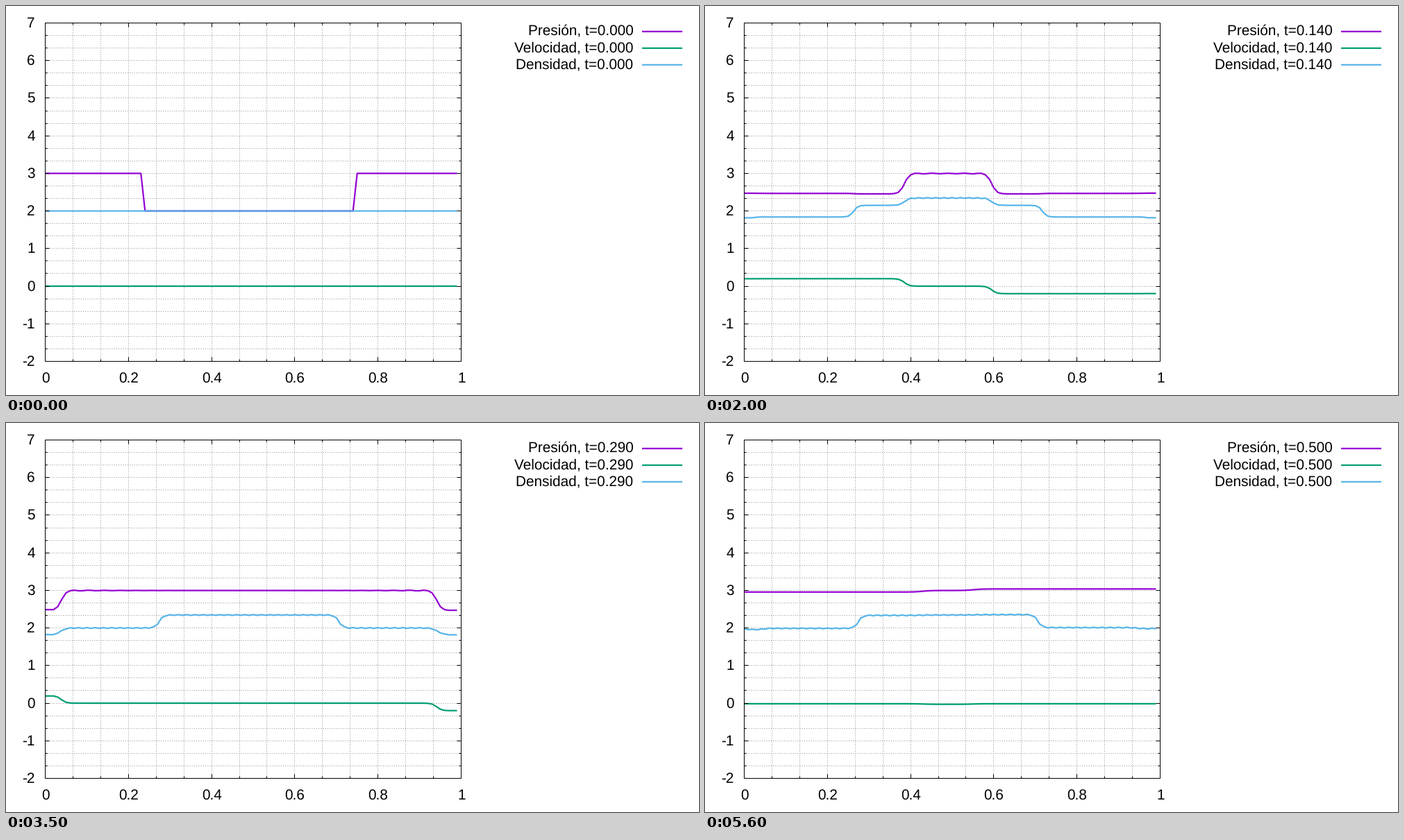
Recreate the animation shown at these times as a matplotlib script. Size 998 by 561 pixels, loop 6.3 s.

```python
import numpy as np
import matplotlib.pyplot as plt
from matplotlib.animation import FuncAnimation

plt.rcParams["font.family"] = "Liberation Sans"
plt.rcParams["text.hinting"] = "none"
plt.rcParams["path.snap"] = False

W, H, DPI = 998, 561, 64
PX = 72 / DPI                                   # points per pixel
LEFT, RIGHT, TOP, BOTTOM = 56.5, 655.5, 24.5, 512.5
FONT = 20.8 * PX
CURVE_WIDTH = 2.2
SERIES = [("Presión", "#9400d3"), ("Velocidad", "#009e73"), ("Densidad", "#56b4e9")]

X = np.arange(100) / 100
MIRROR = 0.98                                   # x and MIRROR - x are symmetric
START = 0.235                                   # initial discontinuity
SHOCK_SPEED = 2.75
COLLISION = (MIRROR / 2 - START) / SHOCK_SPEED


def to_x(x):
    return LEFT + x * (RIGHT - LEFT)


def to_y(y):
    return BOTTOM - (y + 2) / 9 * (BOTTOM - TOP)


def rise(x, center, width):
    return 0.5 * (1 + np.tanh((x - center) / width))


def fields(t):
    """Pressure, velocity and density of the gas at time t."""
    sharp = min(1, 100 * t) + 1e-6
    collided = t > COLLISION
    xs = np.clip(X, 0.02, 0.97)
    d = np.minimum(xs, MIRROR - xs)

    def fan(x):
        return rise(x, START - 2.27 * t, 0.116 * np.sqrt(t) + 1e-8)

    def shock(x):
        if collided:
            return rise(x, front, 0.0115)
        return rise(x, front, 0.013 * sharp)

    if collided:
        since = t - COLLISION
        front = MIRROR / 2 - 2.2 * since - 0.45 * since ** 2
        behind = shock(d) * shock(MIRROR - d)
    else:
        front = START + SHOCK_SPEED * t
        ahead = np.clip(shock(d) + shock(MIRROR - d) - 1, 0, 1)
    contact = rise(d, min(START + 0.2 * t, 0.274), 0.01 * sharp)

    def profile(outer, outer_mid, inner_mid, inner, outer_end, inner_end):
        q = outer + (outer_mid - outer) * fan(d) + (inner_mid - outer_mid) * contact
        if collided:
            return q + behind * ((inner_end - inner_mid) * contact
                                 + (outer_end - outer_mid) * (1 - contact))
        return q + (inner - inner_mid) * ahead

    def flow(x):
        return 0.199 * fan(x) * (1 - shock(x))

    p = profile(3, 2.467, 2.455, 2, 2.997, 2.997)
    rho = profile(2, 1.84, 2.15, 2, 2, 2.345)
    u = flow(xs) - flow(MIRROR - xs)

    if collided:
        depth = np.maximum(d - front, 0)
        p += (0.018 * behind * (depth > 0.02) * np.exp(-depth / 0.08)
              * np.cos(2 * np.pi * (depth - 0.028) / 0.038))
        rho += 0.01 * behind * (-1.0) ** np.arange(X.size)
    if t > 0.12:
        rho -= 0.023 * (1 - rise(np.minimum(X, 0.99 - X), 0.027, 0.005))

    # Weak waves sent back by the two ends.
    reach = 0.2 + 2.7 * (t - 0.37)
    if reach > 0:
        low = 1 - rise(X, reach, 0.02)
        high = rise(X, MIRROR - reach, 0.02)
        p += 0.041 * (high - low)
        rho += 0.01 * (high - low)
        u -= 0.015 * (high + low)
    if t > 0.32:
        rho -= 0.03 * np.exp(-((X - 0.035) / 0.015) ** 2)
        rho -= 0.022 * np.exp(-((X - 0.955) / 0.015) ** 2)
    return p, u, rho


fig = plt.figure(figsize=(W / DPI, H / DPI), dpi=DPI, facecolor="white")
ax = fig.add_axes([0, 0, 1, 1])
ax.set(xlim=(0, W), ylim=(H, 0))
ax.axis("off")


def segment(x0, y0, x1, y1, color="black", width=1, **style):
    ax.plot([x0, x1], [y0, y1], color=color, lw=width * PX,
            solid_capstyle="butt", dash_capstyle="butt", **style)


def label(x, y, text, align):
    return ax.text(x, y, text, fontsize=FONT, ha=align, va="baseline", color="black")


def pixel_center(v):
    return np.floor(v) + 0.5


GRID = dict(color="#a0a0a0", ls=(0, (1.2, 2)), zorder=1)
for k in range(16):
    x, tick = pixel_center(to_x(k / 15)), 3 if k % 3 else 6
    if 0 < k < 15:
        segment(x, BOTTOM, x, TOP, **GRID)
        segment(x, BOTTOM, x, BOTTOM - tick, zorder=4)
        segment(x, TOP, x, TOP + tick, zorder=4)
    if k % 3 == 0:
        label(x + 0.5, 542.6, f"{k / 15:g}", "center")
for k in range(28):
    y, tick = pixel_center(to_y(k / 3 - 2)), 3 if k % 3 else 6
    if 0 < k < 27:
        segment(LEFT, y, RIGHT, y, **GRID)
        segment(LEFT, y, LEFT + tick, y, zorder=4)
        segment(RIGHT, y, RIGHT - tick, y, zorder=4)
    if k % 3 == 0:
        label(41.8, y + 6.3, str(k // 3 - 2), "right")
ax.add_patch(plt.Rectangle((LEFT, TOP), RIGHT - LEFT, BOTTOM - TOP,
                           fill=False, ec="black", lw=PX, zorder=4))

curves, captions = [], []
for row, (name, color) in enumerate(SERIES):
    y = 36.8 + 24 * row
    segment(916, y, 974, y, color, CURVE_WIDTH)
    captions.append(label(903.3, y + 5.6, "", "right"))
    curves += ax.plot([], [], color=color, lw=CURVE_WIDTH * PX, zorder=3,
                      solid_capstyle="butt", solid_joinstyle="round")


def update(frame):
    t = min(max(frame - 6, 0), 50) / 100
    for curve, caption, (name, _), values in zip(curves, captions, SERIES, fields(t)):
        curve.set_data(to_x(X), to_y(values))
        caption.set_text(f"{name}, t={t:.3f}")
    return curves + captions


anim = FuncAnimation(fig, update, frames=63, interval=100, repeat=True, repeat_delay=0)
plt.show()
```
